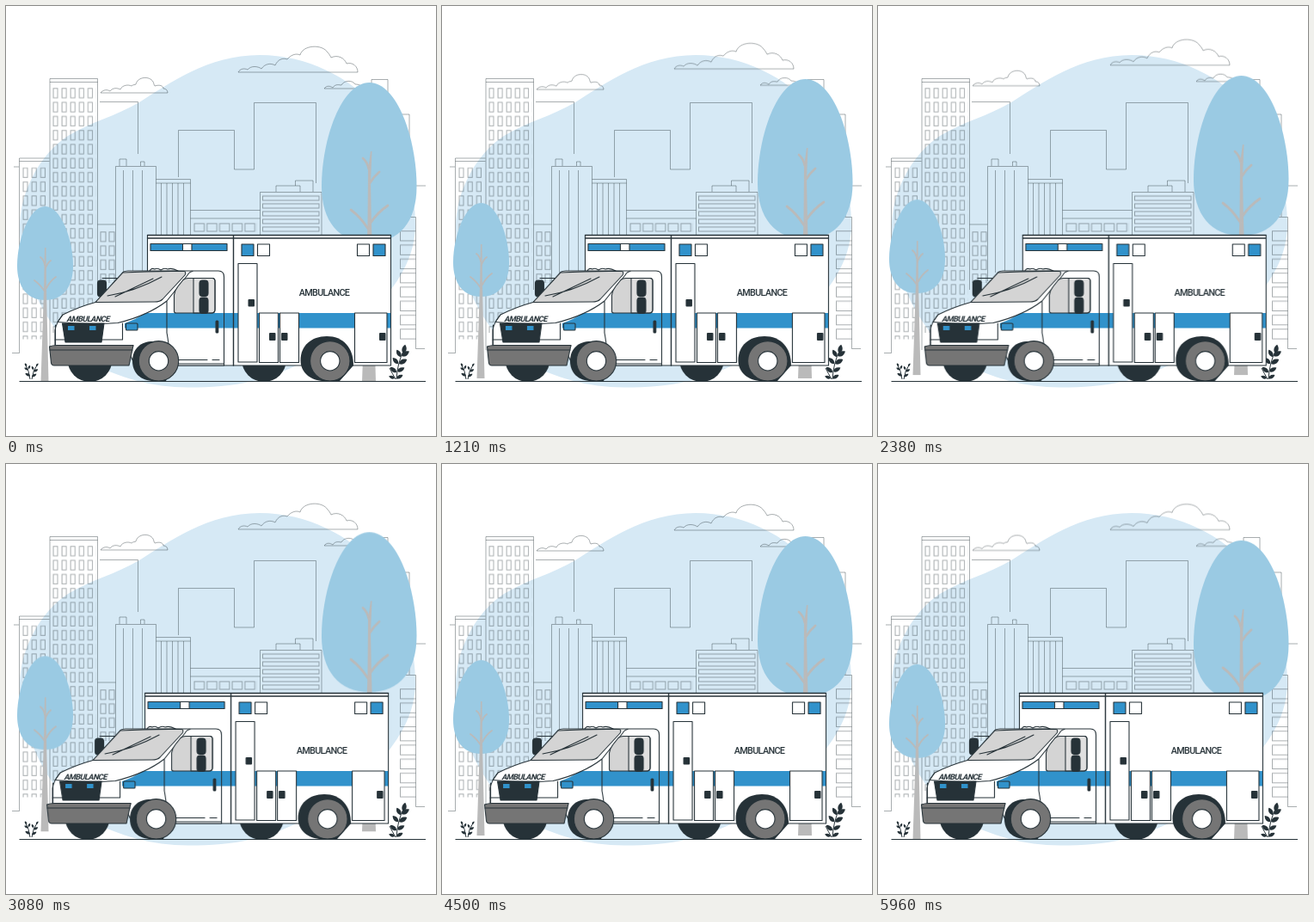
Animation, 500 px wide and 500 px high, one loop 6 s. Source, as an HTML page without scripts:

```html
<!DOCTYPE html>
<html lang="en">
<head>
<meta charset="utf-8">
<title>Ambulance</title>
<style>
  html, body { margin: 0; width: 100%; height: 100%; overflow: hidden; background: #fff; }
  svg { display: block; width: 100vw; height: 100vh; }

  .city { fill: none; stroke: #263238; stroke-opacity: .4; stroke-width: 1; }
  .cloud { fill: none; stroke: #263238; stroke-opacity: .4; stroke-width: 1; stroke-linejoin: round; }
  .leaf { fill: #9acae3; }
  .trunk { fill: #bababa; }
  .twig { fill: none; stroke: #bababa; stroke-linecap: round; }
  .stem { fill: none; stroke: #263238; stroke-width: 1; }
  .ink { fill: #263238; }
  .line { fill: none; }
  .blue { fill: #3192cb; }
  .glass { fill: #d4d4d4; }
  .rubber { fill: #757575; }
  .van { fill: #fff; stroke: #263238; stroke-width: 1.1; stroke-linejoin: round; stroke-linecap: round; }
  .van .flat { stroke: none; }
  .van text {
    fill: #263238; stroke: none; text-anchor: middle;
    font: 500 10.8px Roboto, "Liberation Sans", sans-serif; letter-spacing: -.65px;
  }
  .van .hood { font-size: 9.2px; font-weight: 700; letter-spacing: -.6px; }

  .float { animation: float 1.5s linear infinite; }
  .slow { animation-duration: 6s; }
  .shake { animation: shake 6s linear infinite; }

  @keyframes float {
    50% { transform: translateY(-10px); }
  }
  @keyframes shake {
    10%, 90% { transform: translateX(-1px); }
    20%, 80% { transform: translateX(2px); }
    30%, 50%, 70% { transform: translateX(-4px); }
    40%, 60% { transform: translateX(4px); }
  }
</style>
</head>
<body>
<svg viewBox="0 0 500 500">
  <defs>
    <pattern id="tall" x="54" y="95" width="10.1" height="16.3" patternUnits="userSpaceOnUse">
      <rect class="city" x="1" y=".8" width="5" height="11"/>
    </pattern>
    <pattern id="low" x="19" y="187.5" width="10.2" height="16.3" patternUnits="userSpaceOnUse">
      <rect class="city" x="1" y=".8" width="5" height="11"/>
    </pattern>
    <pattern id="mid" x="109" y="262" width="10" height="16.3" patternUnits="userSpaceOnUse">
      <rect class="city" x="1" y=".8" width="6" height="11"/>
    </pattern>
    <pattern id="wide" x="457" y="261" width="30" height="16.3" patternUnits="userSpaceOnUse">
      <path class="city" d="M19.5 .8H1.5V12H19.5"/>
    </pattern>
    <pattern id="row" x="218" y="252" width="14.7" height="12" patternUnits="userSpaceOnUse">
      <rect class="city" x="1" y="1" width="11.5" height="9"/>
    </pattern>
    <pattern id="slats" x="297" y="220" width="70" height="9" patternUnits="userSpaceOnUse">
      <rect class="city" x="1.5" y="1" width="65.5" height="5"/>
    </pattern>
    <path id="petal" class="ink" d="M0 0C-3.5-2.500-3.500-7 0-10.500C3.500-7 3.500-2.500 0 0Z"/>
    <g id="wheel">
      <circle class="rubber" r="23.2"/>
      <circle r="11.2"/>
    </g>
  </defs>

  <path fill="#d6e9f5" d="M295 57C350 57 400 83 430 118C460 155 477 210 476 258C474 290 462 312 440 340C410 382 340 424 288 436C262 442 238 443.500 212 443.500C170 443.500 130 432 98 414C50 385 16 310 16 258C16 215 40 172 72 151C98 135 128 128 155 112C190 90 235 57 295 57Z"/>

  <g class="city">
    <path d="M7 403.500H15.500V177H50.500M15.500 180.500H50.500M9 187H15"/>
    <path d="M51 400V84.500H106.500V330M51 88.500H106.500"/>
    <path d="M106.500 254H127.500M109 111.500H153.500V172"/>
    <path d="M127.500 320V186.500H174.500V300M136.500 191V310M147.500 191V310M158.500 191V310M132 186V178H140V186M156.500 186V181H161V186"/>
    <path d="M174.500 201.500H214.500V300M174.500 206H214.500M180.500 206V300M187 206V300M193.500 206V300M200 206V300M206.500 206V300"/>
    <path d="M200.500 199V144.500H265.500V190H288.500V112.500H360.500V206"/>
    <path d="M214.500 237.500H295.500M214.500 247H295.500"/>
    <path d="M295.500 270V216.500H367V270M314 216V209H342V216M336.500 209V203H357V216"/>
    <path d="M425 100V85.500H444V126H469V245M477 209H488M457 245.500H476.500V398.500H487"/>
  </g>
  <rect fill="url(#low)" x="19" y="187.500" width="30" height="200"/>
  <rect fill="url(#tall)" x="54" y="95" width="50.500" height="285"/>
  <rect fill="url(#mid)" x="109" y="262" width="18" height="60"/>
  <rect fill="url(#row)" x="218" y="252" width="73.500" height="12"/>
  <rect fill="url(#slats)" x="297" y="220" width="70" height="45"/>
  <rect fill="url(#wide)" x="457" y="261" width="20" height="130"/>

  <g class="float cloud">
    <path d="M270 77C272 73 277 72 281 74C285 69 293 70 297 73C301 67 308 66 313 69C316 62 322 60 327 62C332 56 338 55 342 57C345 45 368 44 374 54C376 56 377 58 378 60C386 56 394 61 396 67C403 65 409 70 409 77Z"/>
    <path d="M110 101C113 97 118 97 121 99C124 95 129 95 133 97C135 92 142 91 146 93C148 91 150 92 151 91C153 82 167 81 171 88C172 90 172 92 173 93C179 91 183 93 183 96C186 96 188 98 188 101Z"/>
    <path d="M370 96C373 92 377 93 380 95C383 90 388 92 390 92C393 86 403 86 406 91C411 91 414 93 415 96Z"/>
  </g>

  <g class="float slow">
    <path class="leaf" d="M422.500 89C455 89 477.500 155 477.500 210C477.500 250 458 275 422.500 275S367 250 367 210C367 155 390 89 422.500 89Z"/>
    <path class="trunk" d="M414 437L420.500 255L421 190L424 169L425.500 169L424 205L425 255L430 437Z"/>
    <path class="twig" stroke-width="2.800" d="M423 206Q428 198 434 193M422 190Q420 181 415 177M421 259Q412 245 401 237M424 252Q432 240 444 232"/>
    <path class="leaf" d="M45.500 233C64 233 78 272 78 302C78 327 66 342 45.500 342S13 327 13 302C13 272 27 233 45.500 233Z"/>
    <path class="trunk" d="M40.500 437L44 330L45 281H46.500L47 330L49.500 437Z"/>
    <path class="twig" stroke-width="1.800" d="M46 305Q48 299 52 296M45 301Q44 295 40 292M45 332Q40 324 33 319M47 328Q51 320 58 315"/>
  </g>

  <g>
    <path class="stem" d="M454 434Q455 415 463 399M453 434Q449 427 446 421"/>
    <use href="#petal" transform="translate(462 404) rotate(12)"/>
    <use href="#petal" transform="translate(459 408) rotate(-30) scale(.9)"/>
    <use href="#petal" transform="translate(460 407) rotate(58)"/>
    <use href="#petal" transform="translate(456 416) rotate(-42) scale(.9)"/>
    <use href="#petal" transform="translate(457 416) rotate(62)"/>
    <use href="#petal" transform="translate(454 426) rotate(-50) scale(.9)"/>
    <use href="#petal" transform="translate(455 425) rotate(62) scale(.9)"/>
    <use href="#petal" transform="translate(452 433) rotate(-68) scale(.7)"/>
    <use href="#petal" transform="translate(454 433) rotate(62) scale(.8)"/>
  </g>
  <g>
    <path class="stem" stroke-width=".8" d="M28 434Q27 424 22 416M30 434Q31 424 37 416"/>
    <use href="#petal" transform="translate(24 419) rotate(-25) scale(.4)"/>
    <use href="#petal" transform="translate(26 423) rotate(-65) scale(.5)"/>
    <use href="#petal" transform="translate(26 422) rotate(25) scale(.45)"/>
    <use href="#petal" transform="translate(28 430) rotate(-65) scale(.6)"/>
    <use href="#petal" transform="translate(35 419) rotate(35) scale(.4)"/>
    <use href="#petal" transform="translate(32 423) rotate(-25) scale(.45)"/>
    <use href="#petal" transform="translate(32 425) rotate(65) scale(.55)"/>
    <use href="#petal" transform="translate(30 431) rotate(60) scale(.6)"/>
  </g>

  <path d="M15.500 436.500H488" stroke="#263238" stroke-width="1.100"/>

  <g class="van shake">
    <circle class="ink flat" cx="97.500" cy="411" r="26"/>
    <circle class="ink flat" cx="300" cy="411" r="26"/>

    <!-- box -->
    <rect x="164.500" y="266.500" width="283" height="151.500"/>
    <path class="blue flat" d="M254 357H447V374.500H254Z"/>
    <path class="line" stroke-width="1.400" d="M164.500 266.500H447.500M164.500 270H447.500M264.500 267V418"/>
    <rect class="blue" x="168" y="276.500" width="89" height="8"/>
    <rect x="205.500" y="276.500" width="10.500" height="8"/>
    <rect class="blue" x="274" y="277" width="14" height="13.500"/>
    <rect x="292.500" y="277" width="14" height="13.500"/>
    <rect x="408.500" y="277" width="14" height="13.500"/>
    <rect class="blue" x="427" y="277" width="14" height="13.500"/>
    <rect x="270" y="299.500" width="22" height="114.500"/>
    <rect x="294.500" y="357" width="22" height="57.500"/>
    <rect x="318.500" y="357" width="22" height="57.500"/>
    <rect x="405.500" y="357" width="37.500" height="57.500"/>
    <g class="ink">
      <rect class="flat" x="281.500" y="341" width="7.500" height="8.500" rx="1"/>
      <rect class="flat" x="306" y="380" width="7.500" height="9" rx="1"/>
      <rect class="flat" x="320" y="380" width="7.500" height="9" rx="1"/>
      <rect class="flat" x="434" y="380" width="7.500" height="9" rx="1"/>
    </g>
    <text x="370" y="336.500">AMBULANCE</text>

    <!-- cab -->
    <path d="M167 308Q169 304 173 306Q176 304 180 307Q184 304 188 306Q193 304 200 308"/>
    <path class="line" d="M112 316.500H131M113 337V341H108"/>
    <rect class="ink" x="106.500" y="319" width="10" height="19" rx="3.500"/>
    <path d="M57 396V377Q58 369 66 359Q84 350 104 344.500L136 309.500Q138 308 142 308H247Q253.500 308 253.500 315V418H150L140 396Z"/>
    <path class="blue flat" d="M162 357H253V374.500H138V369Q152 364 162 357Z"/>
    <path class="glass" d="M104 344.500L136 310Q170 308 207 308.500Q210 309 208 313L182 341Q179 344 173 344Z"/>
    <path class="line" d="M118 337Q150 332 181 315M127 338L171 317"/>
    <path class="line" d="M66 359L60 367.500Q98 371 130 368.500Q165 360 187 343L211 313Q213 309 217 308.500M135.500 369V388H57M57.500 371V395H148M187 343V380Q189 390 191.500 416H253.500M196 411.500H234M240 411.500H248"/>
    <path class="glass" d="M195.500 355V336Q196 331 200 326L206 318.500Q208 316.500 212 316.500H240Q243 316.500 243 320V353Q243 357 239 357H198Q195.500 357 195.500 355Z"/>
    <path d="M218 316.500H240Q243 316.500 243 320V353Q243 357 239 357H218Z" fill-opacity=".25"/>
    <rect class="ink" x="225" y="319" width="10" height="18.500" rx="3.500"/>
    <rect class="ink" x="225" y="339" width="10" height="18.500" rx="3.500"/>
    <rect class="ink flat" x="243.500" y="365.500" width="3.800" height="15" rx="1.500"/>
    <path class="ink" d="M65.500 369H114L111 391H69Z"/>
    <rect class="blue flat" x="72" y="372" width="7.500" height="5"/>
    <rect class="blue flat" x="97" y="372" width="7.500" height="5"/>
    <rect class="blue" x="139.500" y="369" width="13.500" height="8" rx="1"/>
    <text class="hood" transform="translate(95 366.500) skewX(-14)">AMBULANCE</text>

    <!-- wheels and bumper -->
    <path class="ink flat" d="M147 413C147 398 157 390 171 390C187 390 193 400 193 418L186 436H172C156 436 147 426 147 413Z"/>
    <path class="ink flat" d="M342.500 412C342.500 395 355 384 373 384C392 384 404 397 404 418L388 436H370C354 436 342.500 426 342.500 412Z"/>
    <path class="rubber" d="M50.500 396Q54 394.500 60 394.500H148L143 418H56Q53 418 52.500 415Z"/>
    <path class="line" d="M51 400H147"/>
    <use href="#wheel" x="177.500" y="412.800"/>
    <use href="#wheel" x="376.800" y="412.800"/>
  </g>
</svg>
</body>
</html>
```
